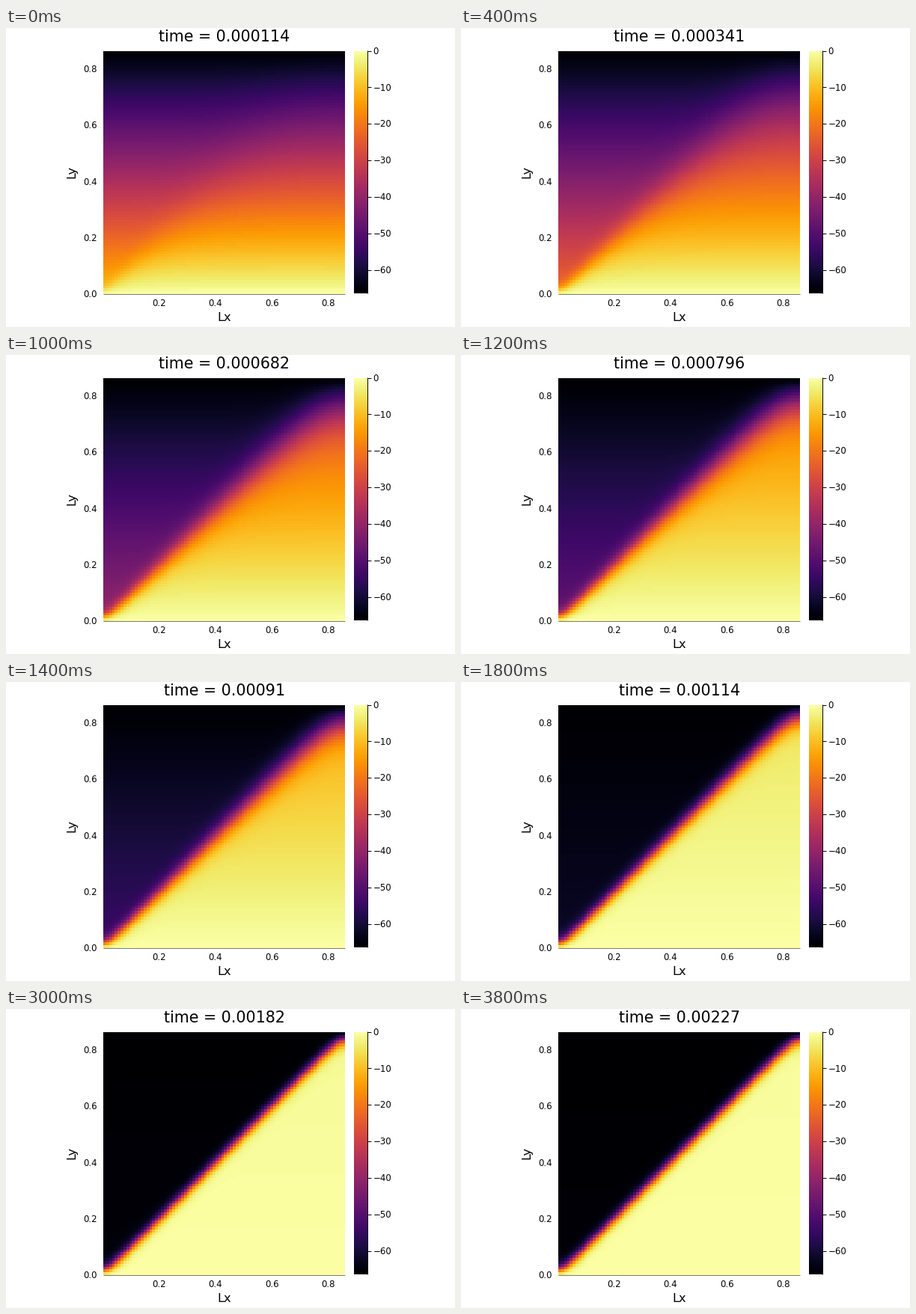
A matplotlib script that plays this animation: 600 px wide and 400 px high, repeating every 4000 ms.

```python
import numpy as np
import matplotlib.pyplot as plt
from matplotlib.animation import FuncAnimation

W, H, DPI = 600, 400, 100
FRAMES, INTERVAL = 20, 200
DT = 0.00011372
VMIN = -66.4
LX, LY = 0.858, 0.862
NX, NY = 84, 85
LEFT, RIGHT, TOP, BOTTOM = 130, 453, 31, 356
SCALE = 377

# Slip share and widening of the shear zone along x, keyed by step
STEPS = [1, 3, 6, 8, 10, 16, 20]
SLIP = np.array([0.14, 0.32, 0.59, 0.81, 0.93, 0.981, 0.988])
SPREAD = np.array([0.35, 0.19, 0.11, 0.055, 0.022, 0.003, 0.002])
CORE = 0.025

x = (np.arange(NX) + 0.5) / NX * LX
y = ((np.arange(NY) + 0.5) / NY * LY)[:, None]


def band_center(x, soft_left, soft_right):
    """Diagonal that flattens at both side walls."""
    v = LX - x
    return LY / LX * (np.hypot(x, soft_left) - np.hypot(v, soft_right) + v)


def velocity(step):
    logit = np.interp(step, STEPS, np.log(SLIP / (1 - SLIP)))
    slip = 1 / (1 + np.exp(-logit))
    spread = np.exp(np.interp(step, STEPS, np.log(SPREAD)))
    width = CORE + spread * x
    soft_right = width[-1] / (1 + 4 * width[-1])
    center = band_center(x, 0.018, soft_right)

    def ramp(h):
        return np.tanh((h - center) / width)

    jump = (ramp(y) - ramp(0)) / (ramp(LY) - ramp(0))
    return VMIN * ((1 - slip) * y / LY + slip * jump)


fig = plt.figure(figsize=(W / DPI, H / DPI), dpi=DPI, facecolor="white")
plt.rcParams["font.family"] = "DejaVu Sans"
ax = fig.add_axes([0, 0, 1, 1])


def label(px, py, text, size=11.8, **kw):
    kw = {"ha": "center", "va": "baseline", **kw}
    return ax.text(px, py, text, fontsize=size * 72 / DPI, color="black", **kw)


def line(xs, ys, color="black", lw=0.7):
    ax.plot(xs, ys, color=color, lw=lw, solid_capstyle="butt")


look = dict(cmap="inferno", vmin=VMIN, vmax=0, origin="lower",
            interpolation="nearest", aspect="auto")
field = ax.imshow(velocity(1), extent=(LEFT, RIGHT, BOTTOM, TOP), **look)
ax.imshow(np.linspace(VMIN, 0, 256)[:, None],
          extent=(465, 483, 355, TOP), **look)

line([LEFT, RIGHT], [BOTTOM, BOTTOM], "#777777")
for v in (0.0, 0.2, 0.4, 0.6, 0.8):
    label(122, BOTTOM - v * SCALE + 4.3, f"{v:.1f}", ha="right")
    if v:
        label(LEFT + v * SCALE - 0.8, 371.5, f"{v:.1f}")

line([482.5, 482.5], [30, 355])
for v in range(0, -61, -10):
    py = 30.5 + v / VMIN * 324.5
    line([482.5, 488], [py, py])
    label(490.5, py + 4.2, f"\u2212{-v}" if v else "0", ha="left")

label(291.5, 392, "Lx", 16.3)
label(88, 192, "Ly", 16.3, rotation=90, va="center")
title = label(291.8, 18.4, "", 20.7)

ax.set_xlim(0, W)
ax.set_ylim(H, 0)
ax.axis("off")


def draw(i):
    step = i + 1
    field.set_data(velocity(step))
    title.set_text(f"time = {step * DT:.3g}")
    return field, title


anim = FuncAnimation(fig, draw, frames=FRAMES, interval=INTERVAL,
                     repeat=True, repeat_delay=0, blit=False)
plt.show()
```
